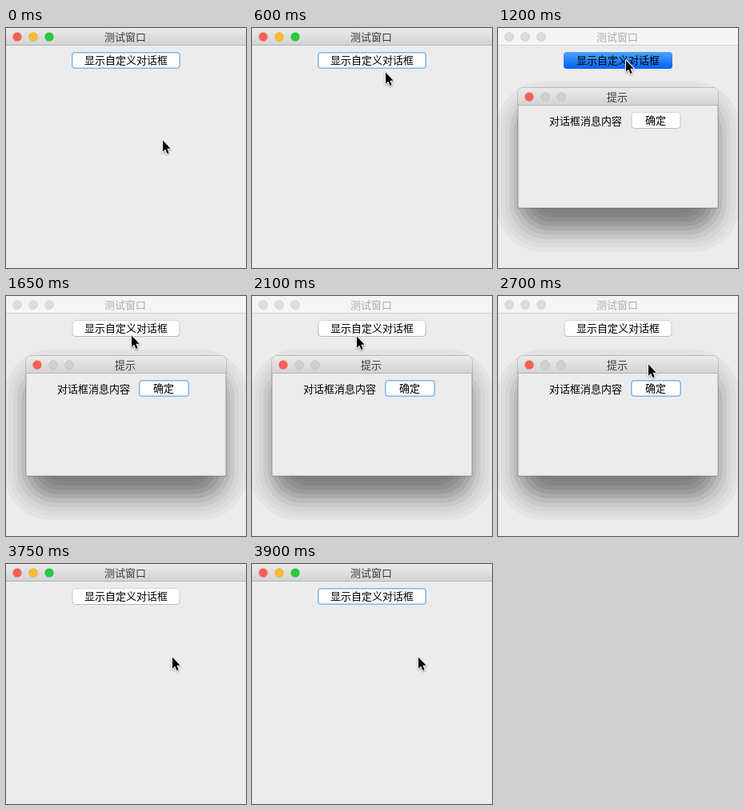
An HTML page with a canvas for the animation above (4950 ms loop, 300 by 300 pixels).

```html
<!DOCTYPE html>
<html lang="zh-CN">
<head>
<meta charset="utf-8">
<style>
  html, body { margin: 0; width: 100%; height: 100%; overflow: hidden; background: #ececec; }
  canvas { display: block; width: 300px; height: 300px; }
</style>
</head>
<body>
<canvas id="stage" width="300" height="300"></canvas>
<script>
const ctx = document.getElementById('stage').getContext('2d');
const LOOP = 4950, TICK = 150;
const PRESS_SHOW = 1050, OPEN = 1200, PRESS_OK = 3300, CLOSE = 3750;

const linear = u => u;
const easeIn = u => u ** 2.4;
const easeOut = u => 1 - (1 - u) ** 2;

// Pointer travel: each move eases from wherever the previous one ended
const START = { x: 195, y: 139 };
const MOVES = [
  { from: 150, to: 450, x: 174, y: 73, ease: easeIn },
  { from: 450, to: 900, x: 159, y: 39, ease: easeOut },
  { from: 1200, to: 1500, x: 156, y: 60, ease: easeIn },
  { from: 1500, to: 1650, x: 156, y: 48, ease: linear },
  { from: 1650, to: 1950, x: 130, y: 58, ease: easeOut },
  { from: 1950, to: 2250, x: 129, y: 40, ease: linear },
  { from: 2550, to: 2700, x: 187, y: 84, ease: linear },
  { from: 2700, to: 3000, x: 207, y: 115, ease: linear }
];
const ARROW = new Path2D('M0 0V14.2L3.2 11.2L5.5 16.4L7.7 15.4L5.4 10.3H9.7Z');
const LIGHTS = ['#ff5f57', '#ffbd2e', '#28c940'];

function roundRect(x, y, w, h, r, fill, stroke, width = 1) {
  ctx.beginPath();
  ctx.roundRect(x, y, w, h, r);
  if (fill) { ctx.fillStyle = fill; ctx.fill(); }
  if (stroke) { ctx.strokeStyle = stroke; ctx.lineWidth = width; ctx.stroke(); }
}

function vertical(y, h, top, bottom) {
  const g = ctx.createLinearGradient(0, y, 0, y + h);
  g.addColorStop(0, top);
  g.addColorStop(1, bottom);
  return g;
}

function label(text, x, baseline, color = '#000') {
  ctx.font = '13px "Noto Sans CJK SC", "Noto Sans CJK", sans-serif';
  ctx.fillStyle = color;
  ctx.fillText(text, x, baseline);
}

function titleBar(x, y, w, title, titleX, active, lit, radius) {
  const h = 22;
  roundRect(x, y, w, h, [radius, radius, 0, 0], active ? vertical(y, h, '#ebebeb', '#d2d2d2') : '#f5f5f5');
  ctx.fillStyle = active ? '#b4b4b4' : '#d3d3d3';
  ctx.fillRect(x, y + h - 1, w, 1);
  LIGHTS.forEach((color, i) => {
    const fill = i < lit ? color : active ? '#d0d0d0' : '#dddddd';
    roundRect(x + 8.5 + 20 * i, y + 5.5, 11, 11, 5.5, fill, 'rgba(0,0,0,.08)');
  });
  label(title, titleX, y + 16, active ? '#3c3c3c' : '#adadad');
}

function button(x, y, w, h, text, textX, state) {
  if (state === 'pressed') {
    roundRect(x, y, w, h, 4, vertical(y, h, '#4ba4ff', '#0060f4'));
  } else if (state === 'focused') {
    roundRect(x + 0.75, y + 0.75, w - 1.5, h - 1.5, 3.5, '#fff', '#7db5ee', 1.5);
  } else {
    roundRect(x + 1, y + 0.5, w - 2, h - 1, 3.5, '#fff', vertical(y, h, '#d4d4d4', '#b8b8b8'));
  }
  label(text, textX, y + 15);
}

function dialogShadow() {
  const bands = 10, step = 5.4;
  for (let i = 0; i < bands; i++) {
    const inset = step * i;
    const depth = 1 / (1 + Math.exp((25 - inset) / 10));
    const grey = Math.round(236 - 118 * depth);
    roundRect(-2 + inset, 67 + inset, 304 - 2 * inset, 213 - 2 * inset,
      58 - 4 * i, `rgb(${grey},${grey},${grey})`);
  }
}

function dialog(okState) {
  dialogShadow();
  roundRect(25, 75, 250, 150, [5, 5, 0, 0], '#ececec', 'rgba(0,0,0,.3)');
  titleBar(25, 75, 250, '提示', 136, true, 1, 5);
  label('对话框消息内容', 64, 121);
  button(166, 105, 63, 21, '确定', 184, okState);
}

function pointer(t) {
  const tick = Math.floor(t / TICK) * TICK;
  let { x, y } = START;
  for (const move of MOVES) {
    const u = Math.min(1, Math.max(0, (tick - move.from) / (move.to - move.from)));
    x += (move.x - x) * move.ease(u);
    y += (move.y - y) * move.ease(u);
  }
  ctx.save();
  ctx.translate(Math.round(x) + 1, Math.round(y) + 1.5);
  ctx.lineJoin = 'round';
  ctx.shadowColor = 'rgba(0,0,0,.4)';
  ctx.shadowBlur = 2;
  ctx.shadowOffsetY = 1;
  ctx.strokeStyle = '#fff';
  ctx.lineWidth = 2;
  ctx.stroke(ARROW);
  ctx.shadowColor = 'transparent';
  ctx.fillStyle = '#000';
  ctx.fill(ARROW);
  ctx.restore();
}

function draw(t) {
  const open = t >= OPEN && t < CLOSE;
  const showState = t < PRESS_SHOW || t >= CLOSE + TICK ? 'focused' : t < OPEN + TICK ? 'pressed' : 'normal';
  const okState = t < OPEN + TICK ? 'normal' : t < PRESS_OK ? 'focused' : 'pressed';

  ctx.fillStyle = '#ececec';
  ctx.fillRect(0, 0, 300, 300);
  titleBar(0, 0, 300, '测试窗口', 123, !open, open ? 0 : 3, 0);
  if (open) dialog(okState);
  button(82, 30, 136, 21, '显示自定义对话框', 98, showState);
  pointer(t);
}

const begin = performance.now();
function frame() {
  draw((performance.now() - begin) % LOOP);
  requestAnimationFrame(frame);
}
frame();
</script>
</body>
</html>
```
